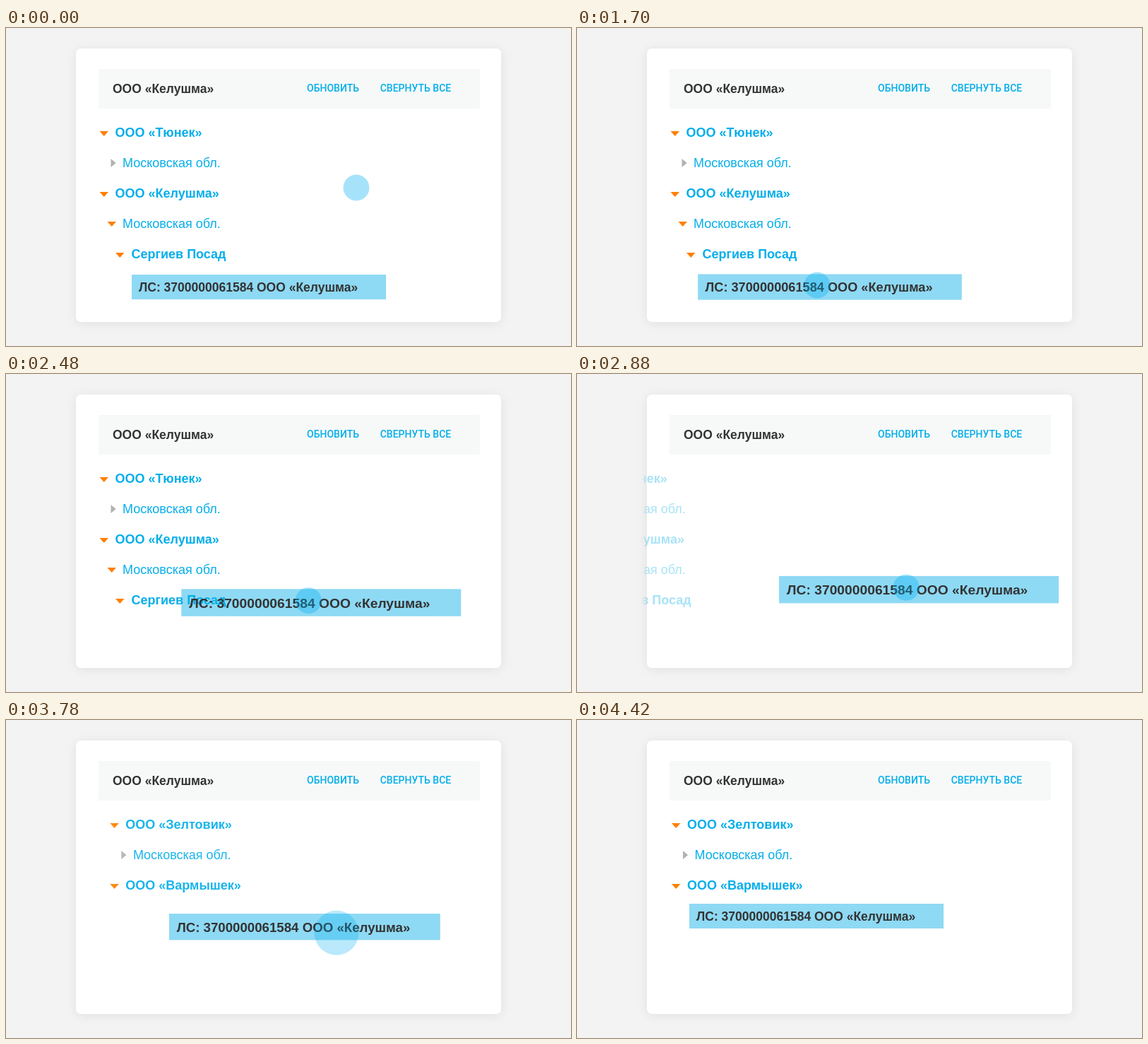
These frames come from a looping animation (800x450 px, 5560 ms). An HTML page with a canvas:

```html
<!DOCTYPE html>
<html lang="ru">
<head>
<meta charset="utf-8">
<title>Перенос лицевого счёта</title>
<style>
  html, body { margin: 0; width: 100%; height: 100%; overflow: hidden; background: #f3f3f3; }
  canvas { display: block; width: 100%; height: 100%; }
</style>
</head>
<body>
<canvas id="stage" width="800" height="450"></canvas>
<script>
const ctx = document.getElementById('stage').getContext('2d');
const LOOP = 5560;
const SANS = '"Liberation Sans", Arial, sans-serif';
const BLUE = '5, 174, 234';
const DARK = '#333333';
const COMPANY = 'ООО «Келушма»';

// Rows: text, text x, centre y, bold, arrow x, arrow is open
const treeBefore = [
  ['ООО «Тюнек»', 154.5, 148, true, 132.5, true],
  ['Московская обл.', 165, 191, false, 148.5, false],
  [COMPANY, 154.5, 234, true, 132.5, true],
  ['Московская обл.', 165, 277, false, 143.5, true],
  ['Сергиев Посад', 177.5, 320, true, 155, true]
];
const treeAfter = [
  ['ООО «Зелтовик»', 156, 148, true, 134, true],
  ['Московская обл.', 166.6, 191, false, 150, false],
  ['ООО «Вармышек»', 156, 234, true, 134, true]
];

const lerp = (a, b, p) => a + (b - a) * p;
const span = (t, start, length) => Math.min(1, Math.max(0, (t - start) / length));
const smooth = x => x * x * (3 - 2 * x);

// cubic-bezier(.4, 0, .2, 1)
function glide(x) {
  let lo = 0, hi = 1;
  for (let i = 0; i < 24; i++) {
    const s = (lo + hi) / 2, r = 1 - s;
    if (1.2 * r * r * s + 0.6 * r * s * s + s * s * s < x) lo = s; else hi = s;
  }
  return smooth(lo);
}

function text(str, x, y, font, fill) {
  ctx.font = font;
  ctx.fillStyle = fill;
  ctx.fillText(str, x, y);
}

function triangle(x1, y1, x2, y2, x3, y3, fill) {
  ctx.fillStyle = fill;
  ctx.beginPath();
  ctx.moveTo(x1, y1);
  ctx.lineTo(x2, y2);
  ctx.lineTo(x3, y3);
  ctx.fill();
}

function drawCard() {
  ctx.fillStyle = '#f3f3f3';
  ctx.fillRect(0, 0, 800, 450);
  ctx.save();
  ctx.shadowColor = 'rgba(0, 0, 0, .08)';
  ctx.shadowBlur = 16;
  ctx.shadowOffsetY = 2;
  ctx.fillStyle = '#fff';
  ctx.beginPath();
  ctx.roundRect(99, 29, 602, 387, 7);
  ctx.fill();
  ctx.restore();
  ctx.fillStyle = '#f7f9f9';
  ctx.fillRect(131, 58, 540, 56);
  text(COMPANY, 151, 92, `bold 17.5px ${SANS}`, DARK);
  const buttonFont = '500 14px Roboto, sans-serif';
  text('ОБНОВИТЬ', 426, 90, buttonFont, `rgb(${BLUE})`);
  text('СВЕРНУТЬ ВСЕ', 529.7, 90, buttonFont, `rgb(${BLUE})`);
}

function drawTree(rows, shift, alpha) {
  if (alpha <= 0) return;
  // Soft edge where rows leave the card
  const edge = rgb => {
    const g = ctx.createLinearGradient(91, 0, 100, 0);
    g.addColorStop(0, `rgba(${rgb}, 0)`);
    g.addColorStop(1, `rgba(${rgb}, 1)`);
    return g;
  };
  const blue = edge(BLUE), orange = edge('255, 127, 0'), grey = edge('178, 178, 178');
  ctx.save();
  ctx.globalAlpha = alpha;
  for (const [label, x, y, bold, arrowX, open] of rows) {
    const ax = arrowX + shift;
    if (open) {
      const top = y - (bold ? 2 : 3);
      triangle(ax, top, ax + 12.5, top, ax + 6.25, top + 7, orange);
    } else {
      triangle(ax, y - 6, ax + 7.2, y, ax, y + 6, grey);
    }
    text(label, x + shift, y + 6, `${bold ? 'bold ' : ''}18px ${SANS}`, blue);
  }
  ctx.restore();
}

function drawAccount(x, y, scale) {
  ctx.save();
  ctx.translate(x, y);
  ctx.scale(scale, scale);
  ctx.fillStyle = 'rgba(5, 170, 231, .45)';
  ctx.fillRect(-180, -17.5, 360, 35);
  text(`ЛС: 3700000061584 ${COMPANY}`, -170, 6.5, `bold 17.5px ${SANS}`, DARK);
  ctx.restore();
}

function drawPointer(t, drag) {
  const u = glide(span(t, 300, 745)), v = 1 - u;
  const x = v * v * 496 + 2 * u * v * 391 + u * u * 340 + 128 * drag;
  const y = v * v * 226 + 2 * u * v * 266 + u * u * 364 - 62.8 * drag;
  const press = Math.sin(Math.PI * span(t, 1070, 350)) ** 2;
  const release = smooth(span(t, 3620, 400));
  if (release >= 1) return;
  ctx.fillStyle = `rgba(0, 174, 239, ${0.35 * (1 - release ** 1.5)})`;
  ctx.beginPath();
  ctx.arc(x, y, lerp(18.5, 55, release) * (1 - 0.15 * press), 0, 2 * Math.PI);
  ctx.fill();
}

function draw(t) {
  drawCard();

  const leave = smooth(span(t, 2640, 400));
  drawTree(treeBefore, -230 * leave, 1 - leave);
  const enter = glide(span(t, 3380, 600));
  drawTree(treeAfter, 170 * (1 - enter), enter);

  const drag = glide(span(t, 2040, 1000));
  const drop = glide(span(t, 3484, 920));
  const lift = smooth(span(t, 1450, 600)) - smooth(span(t, 3546, 600));
  drawAccount(
    lerp(358 + 128 * drag, 339, drop),
    lerp(366.5 - 62.3 * drag, 277.5, drop),
    1 + 0.1 * lift
  );
  drawPointer(t, drag);
}

const began = performance.now();
function tick() {
  draw((performance.now() - began) % LOOP);
  requestAnimationFrame(tick);
}
tick();
</script>
</body>
</html>
```
